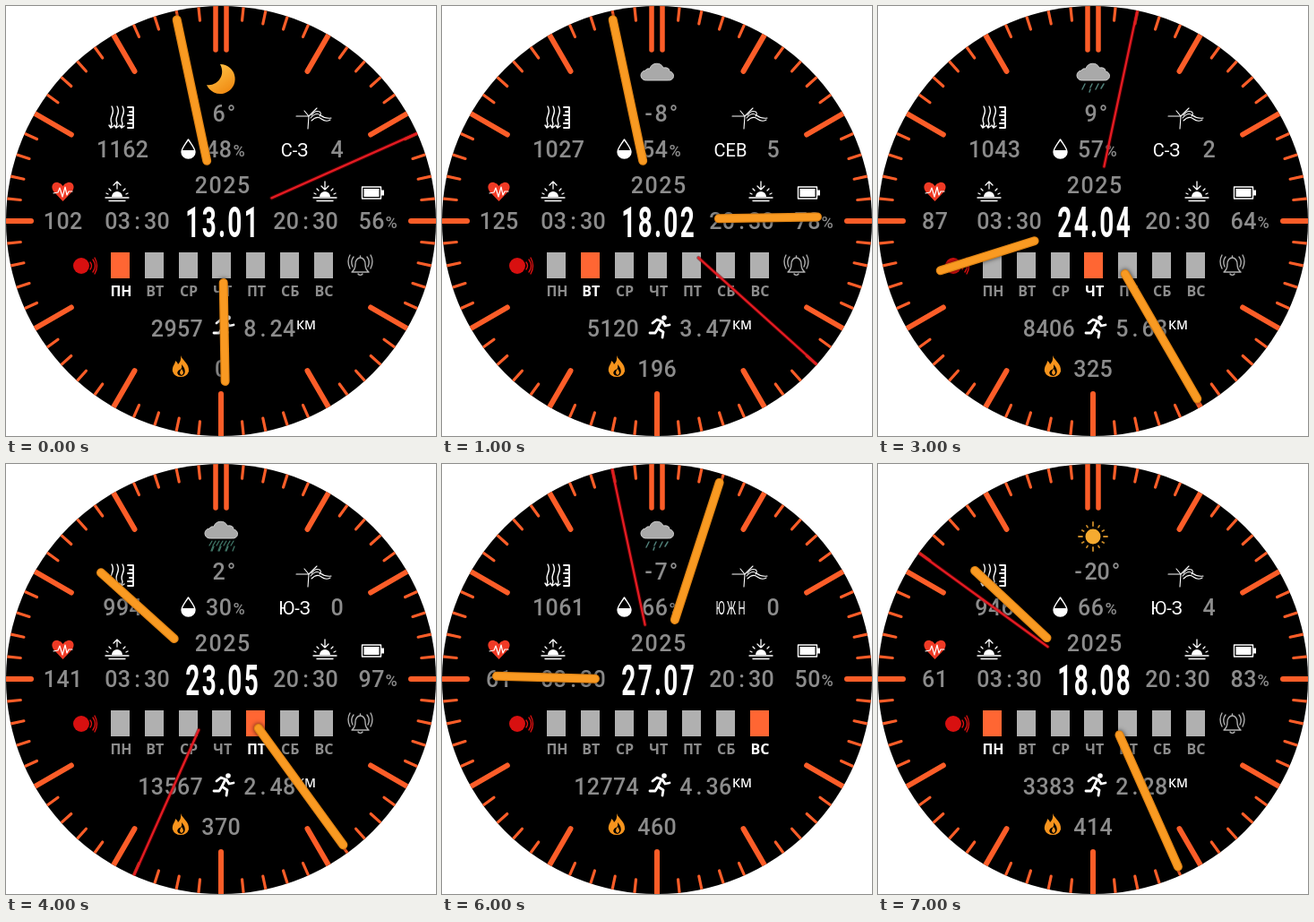
These frames come from a looping animation (480 by 480 pixels, 8000 ms). An HTML page with a canvas:

```html
<!DOCTYPE html>
<html lang="ru">
<head>
<meta charset="utf-8">
<title>Циферблат</title>
<style>
html, body { margin: 0; width: 100%; height: 100%; overflow: hidden; background: #fff }
canvas { display: block }
</style>
</head>
<body>
<canvas width="480" height="480"></canvas>
<script>
const ctx = document.querySelector('canvas').getContext('2d');
const GRAY = '#8c8c8c', ORANGE = '#fc5d28', WHITE = '#fff';
const DAYS = ['ПН', 'ВТ', 'СР', 'ЧТ', 'ПТ', 'СБ', 'ВС'];

const KEYS = 'date day temp pressure humidity wind speed pulse battery steps km kcal sky link alarm h m s'.split(' ');
const STATES = [
  ['13.01', 0, '6°', '1162', '48', 'С-З', '4', '102', '56', '2957', '8.24', '0', 'moon', 1, 1, 5, 58, 11],
  ['18.02', 1, '-8°', '1027', '54', 'СЕВ', '5', '125', '78', '5120', '3.47', '196', 'cloud', 1, 1, 2, 58, 22],
  ['05.03', 2, '-21°', '1117', '82', 'ЮЖН', '7', '139', '23', '3633', '1.11', '50', 'snow', 0, 1, 10, 58, 58],
  ['24.04', 3, '9°', '1043', '57', 'С-З', '2', '87', '64', '8406', '5.63', '325', 'rain', 1, 1, 8, 25, 2],
  ['23.05', 4, '2°', '994', '30', 'Ю-З', '0', '141', '97', '13567', '2.48', '370', 'storm', 1, 1, 10, 24, 34],
  ['28.06', 5, '13°', '1193', '39', 'СЕВ', '3', '98', '32', '598', '0.92', '482', 'fog', 1, 0, 5, 13, 42],
  ['27.07', 6, '-7°', '1061', '66', 'ЮЖН', '0', '61', '50', '12774', '4.36', '460', 'rain', 1, 0, 9, 3, 58],
  ['18.08', 0, '-20°', '946', '66', 'Ю-З', '4', '61', '83', '3383', '2.28', '414', 'sun', 1, 1, 10, 26, 51]
].map(row => Object.fromEntries(KEYS.map((key, i) => [key, row[i]])));

function fill(d, color = WHITE) {
  ctx.fillStyle = color;
  ctx.fill(new Path2D(d));
}

function stroke(d, width = 1.4, color = WHITE) {
  ctx.lineWidth = width;
  ctx.strokeStyle = color;
  ctx.stroke(new Path2D(d));
}

function dot(x, y, r, color = WHITE) {
  ctx.fillStyle = color;
  ctx.beginPath();
  ctx.arc(x, y, r, 0, 7);
  ctx.fill();
}

function text(str, x, y, font, color = GRAY, align = 'center') {
  ctx.font = font;
  ctx.fillStyle = color;
  ctx.textAlign = align;
  ctx.fillText(str, x, y);
}

// Characters sit in equal cells; anchor 0 = left, 0.5 = centre, 1 = right.
function mono(str, x, y, anchor = 0.5, pitch = 14.6) {
  const left = x - str.length * pitch * anchor;
  [...str].forEach((ch, i) => text(ch, left + (i + 0.5) * pitch, y, '500 25px Roboto, sans-serif'));
}

function condensed(str, x, y, font) {
  ctx.save();
  ctx.translate(x, y);
  ctx.scale(0.57, 1);
  ctx.letterSpacing = '4px';
  text(str, 2, 0, font, WHITE);
  ctx.restore();
}

function ray(degrees, from, to, width, color, x = 0) {
  ctx.save();
  ctx.translate(240, 240);
  ctx.rotate(degrees * Math.PI / 180);
  stroke(`M${x} ${-from}V${-to}`, width, color);
  ctx.restore();
}

function dial() {
  for (let i = 1; i < 60; i++) {
    if (i % 5) ray(i * 6, 225, 242, 3.2, ORANGE);
    else ray(i * 6, i % 30 === 15 ? 212 : 193, 244, 6, ORANGE);
  }
  ray(0, 191, 244, 5.5, ORANGE, -6);
  ray(0, 191, 244, 5.5, ORANGE, 6);
}

function cloud() {
  const shape = 'M228 83a5.5 5.5 0 0 1-1-11q2-3 5-2a8 8 0 0 1 15-1q7-1 7 4a5 5 0 0 1-1 10z';
  fill(shape, '#a9a9a9');
  stroke(shape, 1, '#cfcfcf');
}

const SKY = {
  moon() {
    const glow = ctx.createLinearGradient(228, 66, 248, 97);
    glow.addColorStop(0, '#ffc64a');
    glow.addColorStop(1, '#f08a12');
    ctx.fillStyle = glow;
    ctx.fill(new Path2D('M239 65A16.5 16.5 0 1 1 224 88C235 90 246 78 239 65Z'));
  },
  cloud,
  snow() {
    cloud();
    for (const [x, y] of [[229, 88], [240, 87], [251, 88], [234, 94], [246, 94]])
      stroke(`M${x - 2} ${y}h4M${x - 1} ${y - 2}l2 4m0-4l-2 4`, 0.9, '#d8d8d8');
  },
  rain() {
    cloud();
    stroke('M231 87l-3 6M239 87l-2 4M237 93l-1 3M246 87l-3 6M252 87l-3 5', 1.5, '#4f7f78');
  },
  storm() {
    cloud();
    for (let i = 0; i < 7; i++)
      stroke(`M${230 + i * 4} 86l-3 5m${i % 2 ? 1 : 4} 1l-2 5`, 1.3, '#3f7566');
  },
  fog() {
    stroke('M225 69h31M229 74h5m4 0h15M227 79h16m4 0h5M232 84h5m3 0h11M236 89h11M239 93h3', 2);
  },
  sun() {
    dot(240, 81, 8.5, '#f5aa30');
    for (let i = 0; i < 12; i++) {
      const a = i * Math.PI / 6, r = i % 3 ? 14 : 16, c = Math.cos(a), s = Math.sin(a);
      stroke(`M${240 + 12 * c} ${81 + 12 * s}L${240 + r * c} ${81 + r * s}`, 1.8, '#c98a28');
    }
  }
};

function horizon(x, arrow) {
  ctx.save();
  ctx.translate(x, 0);
  fill('M-6 213a6 6 0 0 1 12 0z');
  stroke('M-13 214H13M-9 217.5H9M-12 209l2 1M12 209l-2 1M-9 204l2 2M9 204l-2 2' + arrow, 1.3);
  ctx.restore();
}

function icons() {
  // pressure
  for (const x of [118, 124, 130])
    stroke(`M${x} 112c5 8-4 12 0 19l-1 5m-2-3l2 3 3-2`);
  stroke('M142 113V136M136 113h6M138 118h4M136 122h6M138 127h4M136 131h6M136 136h6', 1.8);
  // wind
  stroke('M338 123l-1 14M338 123h-14M338 123l9-9M338 123l-5-6', 1.1);
  stroke('M340 125q6-7 11-3t12 3M341 128q6-6 11-2t10 1M341 122q4-6 9-4a3 3 0 0 1 0 5', 1.1);
  // humidity
  stroke('M203.5 149C199 156 196 159 196 163a7.5 7 0 0 0 15 0C211 159 208 156 203.5 149Z');
  fill('M196 161h15v2a7.5 7 0 0 1-15 0z');
  // pulse
  fill('M63.5 218L53 207C49 201 53 196 58 197Q62 198 63.5 201Q65 198 69 197C74 196 78 201 74 207Z', '#f03a25');
  stroke('M53 209l5-1 2-5 3 10 3-11 2 9 2-4h4', 1.2);
  horizon(124, 'M0 204V197M-4 200l4-4 4 4');
  horizon(356, 'M0 196V204M-4 201l4 4 4-4');
  // battery
  stroke('M397.5 202h21v13h-21z');
  fill('M399.5 204h17v9h-17zM419 205.5h3v6h-3z');
  // runner
  dot(248, 348, 2.8);
  stroke('M235 354l5-4 5 2-4 8 6 4-1 6M241 360l-3 5h-6M246 352l3 5 5-1', 2.8);
  // calories
  fill('M195 390C197 396 205 399 204 408A9.5 9 0 0 1 186 408C185 402 189 400 189 396Q192 398 192 400Q196 396 195 390Z', '#f7941d');
  fill('M196 400C200 404 202 411 196 413C189 412 191 407 194 406Q197 405 196 400Z', '#000');
  fill('M196 405q4 5 0 7-4-2 0-7z', '#f7941d');
}

function link() {
  dot(84, 290, 9, '#d81010');
  stroke('M94 286q3 4 0 8M97 283q5 7 0 14M99 281q5 9 0 18', 1.4, '#d81010');
}

function bell() {
  stroke('M386 297q4-3 4-9a5.5 7 0 0 1 11 0q0 6 4 9zM393 299a3 3 0 0 0 5 0M395.5 279v2' +
    'M388 280q-4 5-1 11M384 278q-4 7 0 15M403 280q4 5 1 11M407 278q4 7 0 15', 1.4, '#b0b0b0');
}

function hand(degrees, length) {
  ctx.shadowColor = 'rgba(0,0,0,.7)';
  ctx.shadowBlur = 5;
  ray(degrees, 69, length, 10, '#e08414', -1.5);
  ctx.shadowBlur = 0;
  ray(degrees, 69, length, 7.5, '#f99a22', -1.5);
}

function face(v) {
  dial();
  SKY[v.sky]();
  icons();
  if (v.link) link();
  if (v.alarm) bell();

  mono(v.temp, 244.5, 129, 0.5, 14);
  mono(v.pressure, 130, 169);
  mono(v.humidity, 237.5, 168.5);
  mono(v.speed, 369.5, 169);
  mono('2025', 241.5, 209, 0.5, 15.8);
  mono(v.pulse, 63.5, 249);
  mono('03:30', 146.5, 249);
  mono('20:30', 334.5, 249);
  mono(v.battery, 408, 249);
  mono(v.steps, 220, 369, 1);
  mono(v.km, 265, 369, 0);
  mono(v.kcal, 240, 414);
  text('%', 260, 168, '500 18px Roboto, sans-serif');
  text('%', 430, 248, '500 18px Roboto, sans-serif');
  text('КМ', 324, 361, '600 14px "Open Sans", sans-serif', WHITE, 'left');

  const windFont = '400 20px Roboto, sans-serif';
  if (v.wind === 'ЮЖН') condensed(v.wind, 322, 168, windFont);
  else text(v.wind, 322, 168, windFont, WHITE);
  condensed(v.date, 241, 258, '700 49px Roboto, sans-serif');

  DAYS.forEach((name, i) => {
    const x = 128 + i * 37.75, active = i === v.day;
    ctx.fillStyle = active ? '#ff6633' : '#b0b0b0';
    ctx.fillRect(Math.round(x - 10.8), 275, 21, 29);
    text(name, x + 0.5, 324, '700 16px "Open Sans", sans-serif', active ? WHITE : GRAY);
  });

  hand(v.h * 30 + v.m / 2, 179);
  hand(v.m * 6, 230);
  ray(v.s * 6, 62, 239, 4.5, 'rgba(120,0,0,.5)', -0.5);
  ray(v.s * 6, 62, 239, 2.4, '#e31b23', -0.5);
}

function draw() {
  ctx.clearRect(0, 0, 480, 480);
  ctx.save();
  ctx.lineCap = ctx.lineJoin = 'round';
  dot(240, 240, 240, '#000');
  ctx.clip();
  face(STATES[Math.floor(performance.now() / 1000) % STATES.length]);
  ctx.restore();
  requestAnimationFrame(draw);
}
draw();
</script>
</body>
</html>
```
